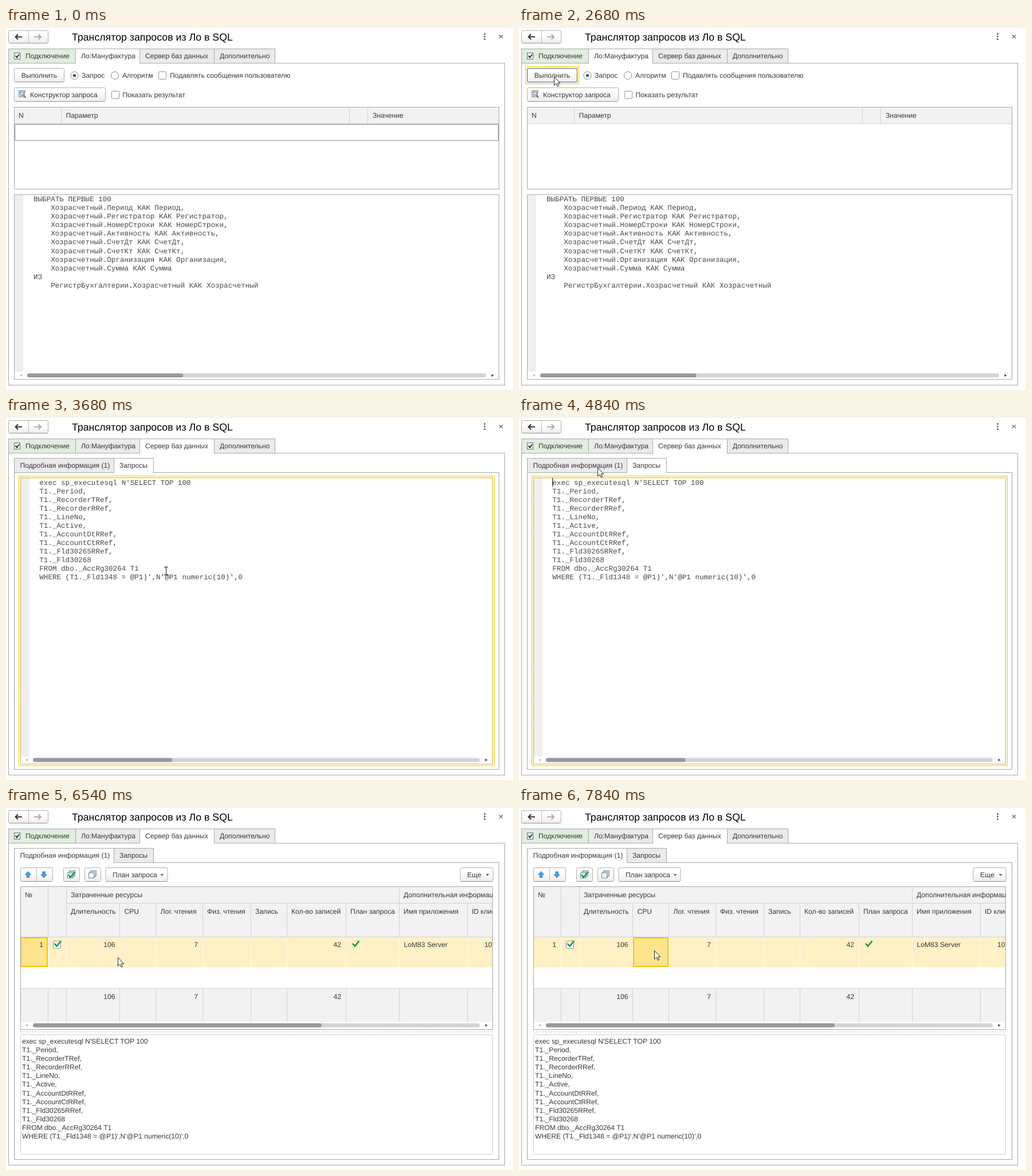
Animation of 885x633 px, one loop 8000 ms. Source, as an HTML page:

```html
<!DOCTYPE html>
<html lang="ru">
<head>
<meta charset="utf-8">
<title>Транслятор запросов</title>
<style>
html, body { margin: 0; width: 100%; height: 100%; overflow: hidden; background: #fff; }
svg { display: block; }
text { font: 12.15px "Liberation Sans", Arial, sans-serif; fill: #383838; white-space: pre; text-rendering: geometricPrecision; }
.title { font-size: 17.75px; fill: #000; }
.code { font: 12.58px "Liberation Mono", "Courier New", monospace; fill: #484848; }
</style>
</head>
<body>
<svg id="stage" width="885" height="633" viewBox="0 0 885 633"></svg>
<script>
const LOOP = 8000;
const EDGE = '#a8a8a8', GRID = '#d2d2d2', HEAD = '#f2f2f2', GOLD = '#f2c500', GREEN = '#0a9648';

// ---- drawing helpers ----
const rect = (x0, y0, x1, y1, fill = '#fff', stroke = 'none', extra = '') =>
  `<rect x="${x0}" y="${y0}" width="${x1 - x0}" height="${y1 - y0}" fill="${fill}" stroke="${stroke}" ${extra}/>`;
const path = (d, stroke = EDGE, extra = '') => `<path d="${d}" fill="none" stroke="${stroke}" ${extra}/>`;
const shape = (d, fill) => `<path d="${d}" fill="${fill}"/>`;
const text = (x, y, s, extra = '') => `<text x="${x}" y="${y}" ${extra}>${s}</text>`;
const right = (x, y, s) => text(x, y, s, 'text-anchor="end"');
const lines = (x, y, list, extra) => list.map((s, i) => text(x, y + i * 15.09, s, extra)).join('');
const group = (id, body) => `<g id="${id}">${body}</g>`;
const button = (x0, y0, x1, y1) =>
  rect(x0, y0, x1, y1, 'url(#face)', '#b0b0b0', 'rx="2"') + path(`M${x0 + 2} ${y1}H${x1 - 2}`, '#909090');
const box = (x, y) => rect(x, y, x + 13, y + 13, '#fff', '#929292', 'rx="1"');
const tick = (x, y) => path(`M${x} ${y}l4 4.5 7.5 -9`, GREEN, 'stroke-width="2.6"');
const drop = (x, y) => shape(`M${x - 3} ${y - 1.5}h6l-3 3.2z`, '#555');
const radio = (x, on) => `<circle cx="${x}" cy="83" r="6.6" fill="#fff" stroke="#868686"/>` +
  (on ? `<circle cx="${x}" cy="83" r="2.6" fill="#2c5f4c"/>` : '');

function scrollbar(x0, x1, thumb, y) {
  return rect(x0, y - 3.5, x1, y + 3.5, '#d4d4d4', 'none', 'rx="3.5"') +
    rect(x0, y - 3.5, thumb, y + 3.5, '#999', 'none', 'rx="3.5"') +
    shape(`M${x0 - 9} ${y - 2.5}v5l-4 -2.5z`, '#bbb') +
    shape(`M${x1 + 9.5} ${y - 2.5}v5l4 -2.5z`, '#444');
}

// Tabs: [left, right, text x, label]; the active one opens into the pane below.
function tabs(list, y0, y1, active, tint) {
  return list.map(([a, b, x, s], i) => {
    const on = i === active;
    const fill = on ? '#fff' : tint && i === 0 ? '#dfeedd' : '#ebebeb';
    return rect(a + .5, y0, b + .5, y1, fill, EDGE) +
      (on ? path(`M${a + 1} ${y1}H${b}`, '#fff', 'stroke-width="1.4"') : '') +
      text(x, y1 - 8.5, s);
  }).join('');
}

const mainTabs = active => tabs([
  [4, 121, 34, 'Подключение'], [121, 233, 131, 'Ло:Мануфактура'],
  [233, 363, 243, 'Сервер баз данных'], [363, 469, 373, 'Дополнительно']
], 36.5, 61.5, active, true) +
  rect(14.5, 43.5, 24.5, 54.5, '#fff', '#666') + path('M16.5 48.5l2.5 3 4 -5.5', '#234', 'stroke-width="2"');

const subTabs = active => rect(14.5, 95.5, 860.5, 614.5, '#fff', EDGE) + tabs([
  [14, 188, 24.5, 'Подробная информация (1)'], [188, 257, 198, 'Запросы']
], 70.5, 95.5, active);

// ---- static content ----
const sql = `exec sp_executesql N'SELECT TOP 100
T1._Period,
T1._RecorderTRef,
T1._RecorderRRef,
T1._LineNo,
T1._Active,
T1._AccountDtRRef,
T1._AccountCtRRef,
T1._Fld30265RRef,
T1._Fld30268
FROM dbo._AccRg30264 T1
WHERE (T1._Fld1348 = @P1)',N'@P1 numeric(10)',0`.split('\n');

const fields = ['Период', 'Регистратор', 'НомерСтроки', 'Активность', 'СчетДт', 'СчетКт', 'Организация', 'Сумма'];
const query = ['ВЫБРАТЬ ПЕРВЫЕ 100',
  ...fields.map((f, i) => `    Хозрасчетный.${f} КАК ${f}${i < 7 ? ',' : ''}`),
  'ИЗ', '    РегистрБухгалтерии.Хозрасчетный КАК Хозрасчетный'];

const defs = `<defs>
  <linearGradient id="face" x2="0" y2="1"><stop offset=".3" stop-color="#fff"/><stop offset="1" stop-color="#ececec"/></linearGradient>
  <pattern id="hatch" width="2" height="2" patternUnits="userSpaceOnUse"><path d="M0 0h2v2h-2z" fill="#f6f6f6"/><path d="M0 0h1v1h-1zM1 1h1v1h-1z" fill="#e9e9e9"/></pattern>
  <clipPath id="grid"><path d="M25 137H849V388H25z"/></clipPath></defs>`;

const frame = rect(0, 0, 885, 633) +
  button(4.5, 4.5, 73.5, 26.5) + path('M39.5 5V26', '#bbb') +
  path('M28 15.5H17M21 11l-4.5 4.5 4.5 4.5', '#333', 'stroke-width="2"') +
  path('M49 15.5H60M56.5 11l4.5 4.5 -4.5 4.5', '#aaa', 'stroke-width="2"') +
  text(115, 21.6, 'Транслятор запросов из Ло в SQL', 'class="title"') +
  [10.5, 15, 19.5].map(y => `<circle cx="835.5" cy="${y}" r="1.4" fill="#555"/>`).join('') +
  path('M861 12l6 6M867 12l-6 6', '#666', 'stroke-width="1.2"') +
  rect(4.5, 61.5, 870.5, 624.5, '#fff', EDGE);

const designerIcon = rect(22.5, 109.5, 32.5, 120.5, '#dfe9f3', '#6f8ba6') +
  path('M23 113h9M26 110v10', '#6f8ba6') +
  `<circle cx="27.5" cy="114.5" r="3" fill="#cfe8ff" stroke="#48729a"/>` +
  path('M29.5 117l5 5', '#c55a2a', 'stroke-width="2"') + path('M34 110l-4 4', '#e28a35', 'stroke-width="2"');

const queryScreen = mainTabs(1) +
  group('ring', rect(11.5, 67.5, 104.5, 97.5, '#fff', GOLD)) +
  button(14.5, 70.5, 101.5, 94.5) +
  group('hover', rect(14.5, 70.5, 101.5, 94.5, 'none', '#5c5c5c', 'rx="2"')) +
  group('press', rect(15, 71, 101, 94, '#e2e2e2')) +
  text(58, 87, 'Выполнить', 'text-anchor="middle"') +
  radio(119.5, true) + text(132, 87, 'Запрос') + radio(190, false) + text(203, 87, 'Алгоритм') +
  box(266.5, 76.5) + text(286, 87, 'Подавлять сообщения пользователю') +
  button(14.5, 104.5, 173.5, 128.5) + designerIcon + text(42, 121, 'Конструктор запроса') +
  box(184.5, 110.5) + text(203.5, 121, 'Показать результат') +
  rect(14.5, 138.5, 860.5, 281.5, '#fff', EDGE) + rect(15, 139, 860, 167, HEAD) +
  path('M15 167.5H860M96.5 139V167M599.5 139V167M631.5 139V167', GRID) +
  text(22, 157, 'N') + text(104.5, 157, 'Параметр') + text(640, 157, 'Значение') +
  group('row', rect(15.5, 168.5, 859.5, 196.5, 'none', '#111', 'stroke-dasharray="1 1" stroke-dashoffset=".5"')) +
  rect(14.5, 291.5, 860.5, 614.5, '#fff', EDGE) + rect(15, 292, 30, 601, 'url(#hatch)') +
  lines(48, 303, query, 'class="code"') + scrollbar(37, 838, 309.5, 607.5);

const sqlScreen = mainTabs(2) + subTabs(1) +
  rect(22.5, 101.5, 852.5, 608, '#fff', GOLD) +
  rect(25.5, 104.5, 849.5, 605, '#fff', '#cfb02c') + rect(26, 105, 41, 592, 'url(#hatch)') +
  lines(58.3, 116.5, sql, 'class="code"') + scrollbar(47, 827, 290.5, 598) +
  group('caret', rect(58, 105, 59.2, 120, '#222'));

function arrowIcon(x, dir) {
  const y = 116.5;
  return `<path d="M${x} ${y - 5.5 * dir}l5 ${5.5 * dir}h-2.7v${5 * dir}h-4.6v${-5 * dir}h-2.7z" fill="#4a9fe8" stroke="#2a6cab" stroke-width=".8"/>`;
}
const stack = (x, fill) => rect(x + 4, 109.5, x + 13, 118.5, '#fff', '#6d8796') +
  rect(x + 2, 111.5, x + 11, 120.5, '#fff', '#6d8796') + rect(x, 113.5, x + 9, 122.5, fill, '#6d8796');

const toolbar = button(25.5, 104.5, 81.5, 128.5) + path('M53.5 105V128', '#bbb') + arrowIcon(38.5, 1) + arrowIcon(66, -1) +
  button(100.5, 104.5, 128.5, 128.5) + stack(107.5, '#effbf0') + path('M109 117l3.5 4 8 -9', GREEN, 'stroke-width="2.6"') +
  button(137.5, 104.5, 165.5, 128.5) + stack(144.5, '#f4f8fa') +
  button(174, 104.5, 282, 128.5) + text(186, 121, 'План запроса') + drop(272.5, 117) +
  button(793, 104.5, 850, 128.5) + text(805, 121, 'Еще') + drop(840.5, 117);

const cols = [73.5, 105.5, 198.5, 261.5, 343.5, 427.5, 490.5, 593.5, 686.5, 805.5];
const heads = [[113, 'Длительность'], [206.5, 'CPU'], [269.5, 'Лог. чтения'], [351, 'Физ. чтения'], [435, 'Запись'],
  [498, 'Кол-во записей'], [601, 'План запроса'], [694, 'Имя приложения'], [813, 'ID клиента']];
const vlines = (list, y0, y1) => list.map(x => `M${x} ${y0}V${y1}`).join('');
const totals = y => right(190.5, y, '106') + right(335, y, '7') + right(585, y, '42');

const table = '<g clip-path="url(#grid)">' +
  rect(25, 137, 850, 388) + rect(25, 137, 850, 225, HEAD) + rect(25, 316, 850, 374, HEAD) +
  rect(25, 226, 850, 278.5, '#fff1c6') +
  path('M105 166.5H850M25 225.5H850M25 315.5H850' + vlines([73.5, 105.5, 686.5], 138, 225) +
    vlines(cols, 167, 225) + vlines(cols, 316, 374), GRID) +
  path(vlines(cols, 226, 278.5), '#fffaf0') +
  text(33, 156, '№') + text(113, 156, 'Затраченные ресурсы') + text(694, 156, 'Дополнительная информация') +
  heads.map(([x, s]) => text(x, 185, s)).join('') +
  `<rect id="cell" y="227" height="50" fill="#ffe48e" stroke="${GOLD}" stroke-width="2"/>` +
  right(65, 243, '1') + box(82.5, 232.5) + tick(84.5, 237) + tick(605, 237) +
  totals(243) + text(694.5, 243, 'LoM83 Server') + text(835, 243, '10') + totals(334) +
  scrollbar(47, 827, 551, 380) + '</g>' + rect(25.5, 137.5, 849.5, 387.5, 'none', EDGE);

const detailScreen = mainTabs(2) + subTabs(0) + toolbar + table +
  path('M25 391.5H850', '#c4c4c4', 'stroke-dasharray="3 2"') +
  rect(25.5, 396.5, 849.5, 605.5, '#fff', '#cfcfcf', 'rx="2"') + lines(28, 412, sql);

const pointer = '<circle id="click" r="11" fill="#fbd22c" opacity=".72"/>' +
  group('arrow', '<path d="M.5 .5V15.4L4 12.2 6.3 17.3 8.5 16.3 6.3 11.3H10.6z" fill="#fff" stroke="#222"/>') +
  group('beam', path('M-3.5 -7h2.5l1 1 1 -1h2.5M0 -6V6M-3.5 7h2.5l1 -1 1 1h2.5', '#222', 'stroke-width="1.1"'));

const $ = id => document.getElementById(id);
$('stage').innerHTML = defs + frame + group('query', queryScreen) + group('sql', sqlScreen) +
  group('detail', detailScreen) + pointer;

// ---- motion ----
const smooth = u => u * u * (3 - 2 * u);
// Pointer moves: start, end, number of steps, evenly timed points.
const moves = [
  { t0: 120, t1: 820, n: 10, ease: smooth, pts: [[838, 646], [61, 85]] },
  { t0: 3450, t1: 3840, n: 6, pts: [[61, 85], [150, 185], [279.5, 267.5], [470.5, 304.5]] },
  { t0: 3990, t1: 3991, n: 1, pts: [[470.5, 304.5], [470.5, 303.5]] },
  { t0: 4220, t1: 4530, n: 5, pts: [[470.5, 303.5], [340, 235], [180, 115], [137, 86.5]] },
  { t0: 6000, t1: 6770, n: 11, pts: [[137, 86.5], [140, 96], [155, 130], [190, 195], [240, 270], [280, 315],
    [291, 325], [250, 300], [195, 261], [165, 247], [148, 242], [148, 242]] },
  { t0: 7380, t1: 7840, n: 7, pts: [[148, 242], [155, 243], [180, 247], [215, 250], [233, 249.5], [236, 249], [236, 249], [236, 249]] }
];
const clicks = [[1600, 2300], [5370, 5450], [6770, 6920], [7760, 7840]];
const carets = [[2760, 3220], [3750, 4280], [4840, 5370]];
const within = (list, t) => list.some(([a, b]) => t >= a && t < b);

function pointerAt(t) {
  const m = moves.filter(v => t >= v.t0).pop();
  if (!m) return null;
  const gap = (m.t1 - m.t0) / Math.max(1, m.n - 1);
  let u = Math.min(m.n, Math.floor((t - m.t0) / gap + .1) + 1) / m.n;
  if (m.ease) u = m.ease(u);
  const last = m.pts.length - 1;
  const i = Math.min(last - 1, Math.floor(u * last + 1e-6));
  const f = u * last - i, [a, b] = [m.pts[i], m.pts[i + 1]];
  return [a[0] + (b[0] - a[0]) * f, a[1] + (b[1] - a[1]) * f];
}

const show = (id, on) => $(id).setAttribute('display', on ? 'inline' : 'none');

function draw(t) {
  const screen = t < 2760 ? 'query' : t < 5370 ? 'sql' : 'detail';
  ['query', 'sql', 'detail'].forEach(id => show(id, id === screen));
  show('hover', t >= 820);
  show('press', t >= 1600 && t < 2300);
  show('ring', t >= 1600);
  show('row', t < 1600);
  show('caret', within(carets, t));

  const [x0, x1] = t < 6765 ? [26, 72] : t < 7760 ? [107, 197] : [200, 260];
  $('cell').setAttribute('x', x0);
  $('cell').setAttribute('width', x1 - x0);

  const p = pointerAt(t);
  const top = screen === 'query' ? 292 : screen === 'sql' ? 104 : 999;
  const typing = p && p[0] > 30 && p[0] < 850 && p[1] > top && p[1] < 602;
  show('arrow', p && !typing);
  show('beam', typing);
  show('click', within(clicks, t));
  if (p) {
    const at = `translate(${p.map(v => v.toFixed(1)).join(' ')})`;
    ['arrow', 'beam', 'click'].forEach(id => $(id).setAttribute('transform', at));
  }
}

const start = performance.now();
function tickFrame() {
  draw((performance.now() - start) % LOOP);
  requestAnimationFrame(tickFrame);
}
draw(0);
requestAnimationFrame(tickFrame);
</script>
</body>
</html>
```
